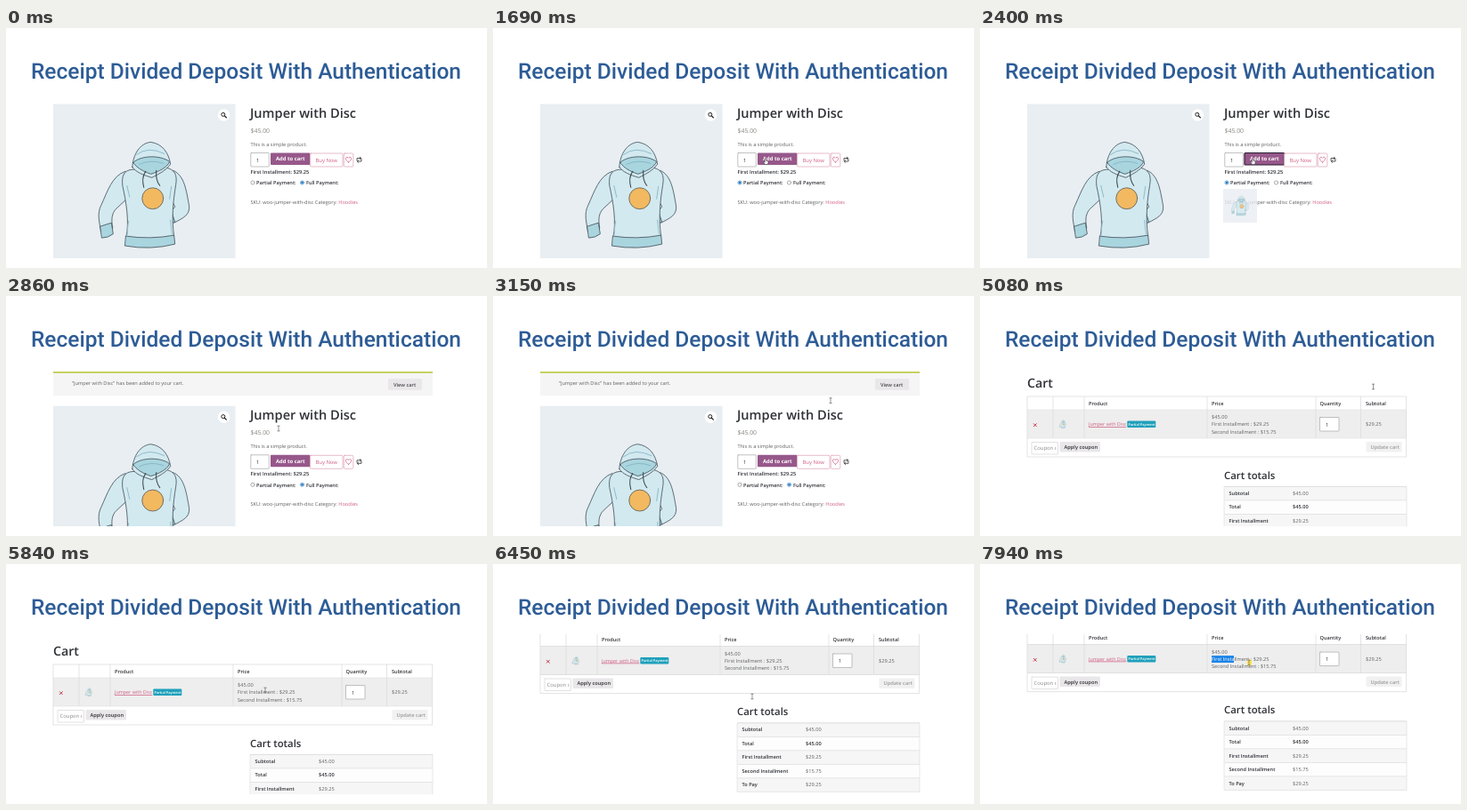
Write an HTML page with a canvas that moves like this. It is 540 by 270 pixels and loops after 8000 ms.

```html
<!DOCTYPE html>
<html lang="en">
<head>
<meta charset="utf-8">
<title>Cart demo</title>
<style>
html, body { margin: 0; width: 100%; height: 100%; overflow: hidden; background: #fff; }
canvas { display: block; width: 540px; height: 270px; }
</style>
</head>
<body>
<canvas id="stage"></canvas>
<script>
const LOOP = 8000;
const PRODUCT = 'Jumper with Disc';
const INK = '#2f3136', BODY = '#5f6164', PINK = '#cf5f82', PURPLE = '#96588a', GREY = '#e9e7e9';
const canvas = document.getElementById('stage');
const ctx = canvas.getContext('2d');
const dpr = window.devicePixelRatio || 1;
canvas.width = 540 * dpr;
canvas.height = 270 * dpr;

const clamp = v => Math.max(0, Math.min(1, v));
const span = (t, a, b) => clamp((t - a) / (b - a));
const smooth = p => p * p * (3 - 2 * p);
const expoInOut = p => p <= 0 ? 0 : p < 0.5 ? 2 ** (20 * p - 11) : 1 - 2 ** (9 - 20 * p);

// Draws text and returns its right edge.
function text(str, x, y, size = 5.65, color = BODY, weight = 400) {
  ctx.font = `${weight} ${size}px "Open Sans", "Noto Sans", sans-serif`;
  ctx.fillStyle = color;
  ctx.fillText(str, x, y);
  return x + ctx.measureText(str).width;
}

function rect(x, y, w, h, fill, stroke, r = 0, line = 0.7) {
  ctx.beginPath();
  ctx.roundRect(x, y, w, h, r);
  if (fill) { ctx.fillStyle = fill; ctx.fill(); }
  if (stroke) { ctx.strokeStyle = stroke; ctx.lineWidth = line; ctx.stroke(); }
}

function disc(x, y, r, fill, stroke, line = 0.7) {
  ctx.beginPath();
  ctx.arc(x, y, r, 0, 7);
  if (fill) { ctx.fillStyle = fill; ctx.fill(); }
  if (stroke) { ctx.strokeStyle = stroke; ctx.lineWidth = line; ctx.stroke(); }
}

function path(d, fill, stroke, line = 0.8) {
  const p = new Path2D(d);
  if (fill) { ctx.fillStyle = fill; ctx.fill(p); }
  if (stroke) {
    ctx.strokeStyle = stroke;
    ctx.lineWidth = line;
    ctx.lineJoin = ctx.lineCap = 'round';
    ctx.stroke(p);
  }
}

const hline = (x1, x2, y, color) => rect(x1, y - 0.35, x2 - x1, 0.7, color);
const vline = (x, y1, y2, color) => rect(x - 0.35, y1, 0.7, y2 - y1, color);

function hoodie() {
  const cloth = '#d2e9f0', shade = '#a9d5df', edge = '#3f4b53';
  path('M134 161C119 166 114 184 107 199C102 208 105 220 107 229L120 225C118 215 119 208 124 203L138 190Z', cloth, edge);
  path('M106 223L118.500 219L120.500 231.500Q115 236 108 236Z', shade, edge);
  path('M188 160C201 165 203 184 206 200C207 211 198 214 189 219L184 208L190 201L184 188Z', cloth, edge);
  path('M186 206L190 218L184 221L180 210Z', shade, edge);
  path('M141 159C132 160 130 167 131 177C135 195 139 218 135 235Q162 239 189 234C186 214 188 194 191 176C193 164 189 159 181 157Z', cloth, edge);
  path('M135 234Q162 238 189 233L190 243Q163 250 134 245Z', shade, edge);
  path('M138 217C136 225 137 230 136 234M185 216Q186 228 187 232M136 177L139 190M186 178L184 192', null, '#8fbcc8', 1);
  path('M142 156C143 141 151 129 163 128C176 130 183 140 185 153C180 160 172 164 164 168C154 165 146 162 142 156Z', cloth, edge);
  path('M143 151C151 143 173 142 184 150C181 157 172 161 163 164C154 161 147 157 143 151Z', shade, edge);
  path('M147 142Q160 132 178 141M150 153Q163 147 177 152', null, '#7fb0bf', 0.8);
  path('M157 161Q152 168 155 179M169 160Q168 171 173 177', null, edge, 1.1);
  disc(165, 191.500, 12, '#f2b961', edge, 0.7);
}

// Product picture as a square of side s.
function picture(x, y, s, back) {
  ctx.save();
  ctx.translate(x, y);
  ctx.scale(s / 205, s / 205);
  ctx.translate(-53, -85);
  if (back) rect(53, 85, 205, 205, '#e8eef2');
  hoodie();
  ctx.restore();
}

function radio(x, on) {
  disc(x, 174, 2.1, '#fff', on ? '#2a7fc4' : '#777', 0.6);
  if (on) disc(x, 174, 1.4, '#2a7fc4');
}

function product(partial, focus) {
  picture(53, 85.500, 204.500, true);
  disc(244.500, 98, 6.7, '#fff');
  disc(243.800, 97.300, 2, null, '#222', 1);
  path('M245.400 98.900L247.300 100.800', null, '#222', 1.3);

  text(PRODUCT, 274, 101, 14.6, INK, 600);
  text('$45.00', 274.500, 118, 6.9, '#85867c');
  text('This is a simple product.', 274.500, 133);
  rect(274.800, 140.500, 20.500, 15.500, '#fff', '#a6a6a6', 0.5);
  text('1', 281, 150.500, 5.8, INK);
  rect(297, 140.500, 44.500, 13.500, PURPLE, focus && '#2b1c33', 1, 1.2);
  text('Add to cart', 303, 149.300, 5.9, '#fff', 700);
  rect(341.500, 141, 36.500, 15, '#fff', '#dfa0b4', 1);
  text('Buy Now', 347.500, 150.800, 5.9, PINK);
  rect(379.300, 141, 10.500, 15, '#fff', '#dfa0b4', 1);
  path('M384.500 151C378.500 147 382.500 143.500 384.500 146.300C386.500 143.500 390.500 147 384.500 151Z', null, PINK, 0.8);
  path('M394 149V146.500H398.500M397.300 145.200L398.700 146.500L397.300 147.800M399 147.500V150H394.500M395.700 148.700L394.300 150L395.700 151.300', null, '#333', 0.8);

  text('First Installment: $29.25', 274.500, 164, 5.7, INK, 600);
  radio(277, partial);
  radio(332.500, !partial);
  text('Partial Payment:', 281, 176.200, 5.6, INK, 600);
  text('Full Payment:', 337, 176.200, 5.6, INK, 600);
  const end = text('SKU: woo-jumper-with-disc Category: ', 274.500, 197.500);
  text('Hoodies', end, 197.500, 5.65, PINK);
}

function notice(t) {
  rect(53, 85, 426, 27, '#f6f5f6');
  rect(53, 85, 426, 1.8, '#bfcc4c');
  if (t >= 3200) {
    disc(65, 97.500, 3, '#8f9a30');
    path('M63.600 97.600L64.700 98.700L66.600 96.500', null, '#fff', 0.8);
  }
  text(`“${PRODUCT}” has been added to your cart.`, 74, 99.700, 5.65);
  rect(429, 93, 38, 12.700, t >= 3330 ? '#dddadd' : GREY, null, 1);
  text('View cart', 435, 101.600, 5.7, '#4b4b4f', 600);
}

const LABEL = 'First Installment : $29.25';

function cart(t) {
  const line = '#d9d9d9';
  text('Cart', 53, 103, 14.2, INK, 600);
  rect(53, 128, 425.500, 32, '#eeeeee');
  for (const y of [128, 160]) hline(53, 478.500, y, line);
  rect(53, 113, 425.500, 68, null, line);
  for (const x of [82, 117, 255, 377, 427.500]) vline(x, 113, 160, line);
  [['Product', 122], ['Price', 260], ['Quantity', 381.500], ['Subtotal', 433]]
    .forEach(([s, x]) => text(s, x, 122.700, 5.6, INK, 600));

  path('M60.300 143.700L63.300 146.700M63.300 143.700L60.300 146.700', null, '#c3283c', 0.9);
  picture(85, 136, 16, false);
  const end = text(PRODUCT, 122, 146.300, 5.4, PINK);
  hline(122, end, 147.300, PINK);
  rect(end + 1, 140.500, 32, 7.500, '#1fa0bb', null, 1);
  text('Partial Payment', end + 2.200, 145.900, 3.9, '#fff', 600);
  text('$45.00', 260, 138.200);
  text(LABEL, 260, 146.400);
  text('Second Installment : $15.75', 260, 154.500);

  const sel = 25 * span(t, 7800, 7940);
  if (sel) {
    ctx.save();
    ctx.beginPath();
    ctx.rect(260, 140.500, sel, 8);
    ctx.clip();
    rect(260, 140.500, sel, 8, '#1b83e8');
    text(LABEL, 260, 146.400, 5.65, '#fff');
    ctx.restore();
  }

  rect(381.500, 136.500, 21.500, 15.500, '#fff', '#a6a6a6', 0.5);
  text('1', 388, 146.500, 5.8, INK);
  text('$29.25', 433, 146.400);

  rect(58, 164.500, 29.500, 13.500, '#fff', '#d4d4d4', 0.5);
  ctx.save();
  ctx.beginPath();
  ctx.rect(58, 164, 27.500, 14);
  ctx.clip();
  text('Coupon code', 60.500, 173.400, 5.9, '#8a8a8a');
  ctx.restore();
  rect(89.500, 164, 45.500, 11.500, GREY, null, 1);
  text('Apply coupon', 94.500, 171.900, 5.7, INK, 600);
  rect(433.500, 164, 40, 11.500, '#f2f1f2', null, 1);
  text('Update cart', 438.500, 171.900, 5.7, '#9a9a9c', 600);

  text('Cart totals', 274, 205.700, 11.4, INK, 600);
  [['Subtotal', '$45.00'], ['Total', '$45.00'], ['First Installment', '$29.25'],
   ['Second Installment', '$15.75'], ['To Pay', '$29.25']].forEach(([s, v], i) => {
    const y = 214.300 + 15.5 * i;
    rect(274.500, y, 204.500, 15.500, i % 2 ? '#fdfdfd' : '#f6f6f6');
    hline(274.500, 479, y, '#dedede');
    text(s, 279.500, y + 9.600, 5.6, INK, 600);
    text(v, 351, y + 9.600, 5.65, i === 1 ? INK : BODY, i === 1 ? 600 : 400);
  });
  rect(274.500, 214.300, 204.500, 77.500, null, '#dedede');
}

// Time, x, y and an optional upward bow of the way there.
const WAY = [
  [130, 353, 233], [620, 276, 173], [1420, 276, 173], [1700, 306, 149],
  [2860, 306, 149], [3410, 441, 102, 6], [3670, 441, 102], [3750, 442, 104],
  [4280, 442, 104], [4350, 441.5, 102], [5080, 441.5, 102], [5840, 291, 142],
  [5910, 291, 142], [6450, 291, 149], [6720, 291, 149], [7410, 261, 107],
  [7800, 261, 107], [7940, 302, 111]
];

function pointer(t) {
  const i = WAY.findIndex(k => k[0] > t);
  if (i < 0) return WAY[WAY.length - 1].slice(1);
  const [t0, x0, y0] = WAY[i - 1];
  const [t1, x1, y1, bow = 0] = WAY[i];
  const p = smooth(span(t, t0, t1));
  return [x0 + (x1 - x0) * p, y0 + (y1 - y0) * p - bow * 4 * p * (1 - p)];
}

function cursor(t) {
  if (t < 130) return;
  const [x, y] = pointer(t);
  ctx.save();
  ctx.translate(x, y);
  if ((t > 1640 && t < 2860) || (t > 3330 && t < 5080)) {
    path('M-.8 -2Q0 -3 .6 -2V0L2.600 .6Q3.500 1 3 3L2.500 4.500H-.4L-2.300 1.700Q-2 .7 -.8 1.600Z', '#fff', '#333', 0.6);
  } else if (t < 1640) {
    path('M0 0V5.500L1.300 4.400L2.200 6.300L3 5.900L2.200 4.100H4Z', '#fff', '#333', 0.5);
  } else {
    if (t >= 7540) {
      ctx.beginPath();
      ctx.ellipse(0.5, 0, 2.6, 3.8, 0, 0, 7);
      ctx.fillStyle = 'rgba(255,222,40,.8)';
      ctx.fill();
    }
    path('M-1.200 -2.800H1.200M0 -2.800V2.800M-1.200 2.800H1.200', null, '#6b6b6b', 0.7);
  }
  ctx.restore();
}

function flyer(t) {
  if (t < 1720) return;
  const p = expoInOut((Math.min(t, 2400) - 1720) / 1000) / expoInOut(0.68);
  ctx.globalAlpha = 0.78;
  picture(53 + 220 * p, 85 + 96 * p, 75 - 37 * p, true);
  ctx.globalAlpha = 1;
}

function draw(t) {
  ctx.setTransform(dpr, 0, 0, dpr, 0, 0);
  ctx.textRendering = 'geometricPrecision';
  rect(0, 0, 540, 270, '#fff');

  ctx.font = '500 24.5px Roboto, "Open Sans", sans-serif';
  ctx.fillStyle = '#2d5c96';
  ctx.textAlign = 'center';
  ctx.fillText('Receipt Divided Deposit With Authentication', 269.5, 56.7);
  ctx.textAlign = 'left';

  ctx.save();
  ctx.beginPath();
  ctx.rect(50, 79, 432, 180);
  ctx.clip();
  if (t < 2860) {
    product(t >= 1020, t >= 1700);
    flyer(t);
  } else if (t < 5080) {
    ctx.save();
    ctx.translate(0, 38.3);
    product(false, false);
    ctx.restore();
    notice(t);
  } else {
    ctx.save();
    ctx.translate(0, -37.4 * (1 - (1 - span(t, 5880, 6650)) ** 2.2));
    cart(t);
    ctx.restore();
  }
  cursor(t);
  ctx.restore();
}

let start;
function frame(now) {
  start ??= now;
  draw((now - start) % LOOP);
  requestAnimationFrame(frame);
}
draw(0);
requestAnimationFrame(frame);
</script>
</body>
</html>
```
